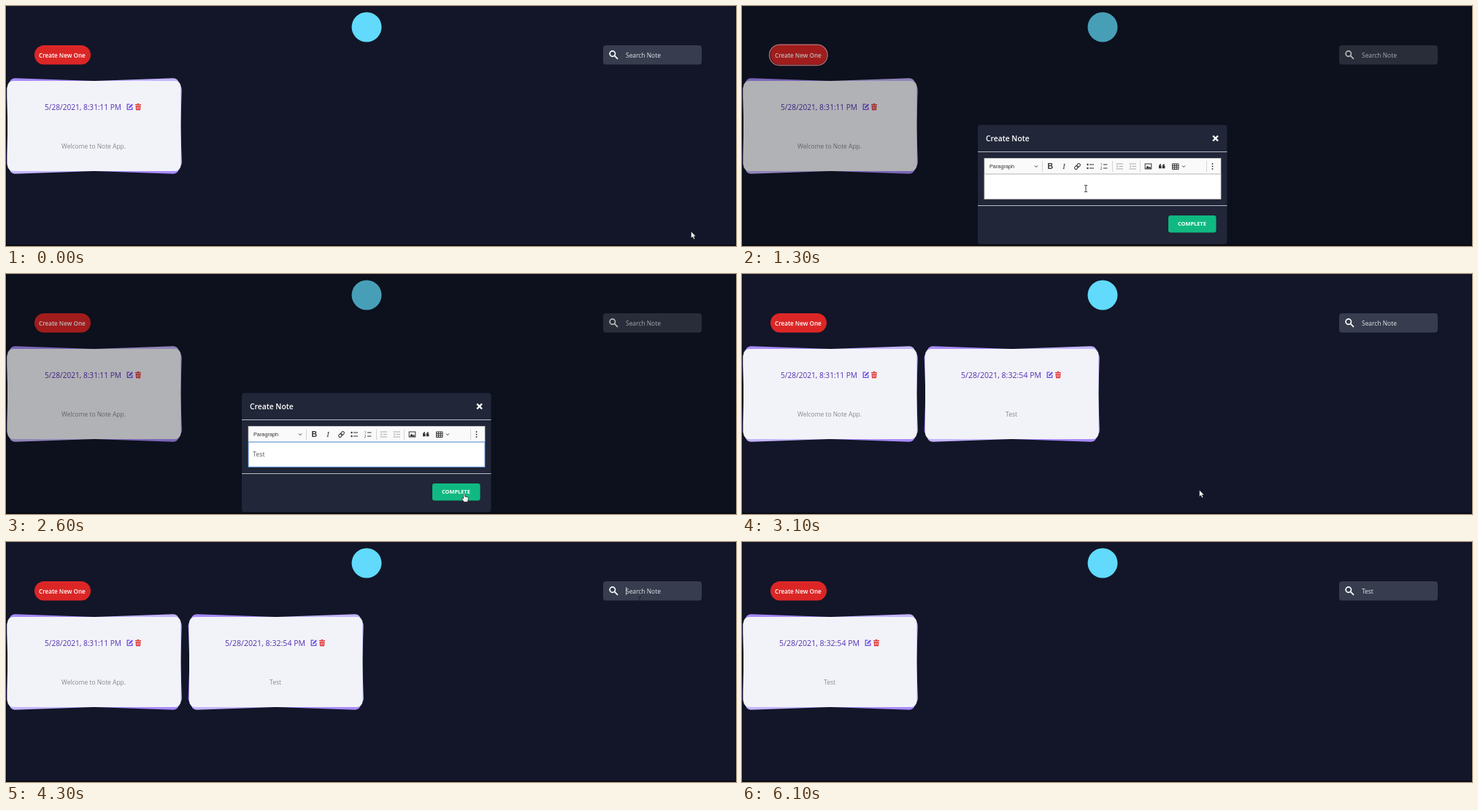
Animation of 1000 by 330 pixels, one loop 6.2 s. Source, as an HTML page:

```html
<!DOCTYPE html>
<html lang="en">
<head>
<meta charset="utf-8">
<title>Note board</title>
<style>
  html, body { margin: 0; width: 100%; height: 100%; overflow: hidden; background: #121628; }
  svg { display: block; width: 100%; height: 100%; }
  text { font-family: "Open Sans", "Noto Sans", sans-serif; font-size: 8.45px; white-space: pre; }
  .bold { font-weight: 600; fill: #fff; }
  .line { fill: none; stroke: #333; stroke-width: 1; }
  .pale { stroke: #aaa; }
</style>
</head>
<body>
<svg viewBox="0 0 1000 330">
  <defs>
    <g id="paper">
      <rect x="2.5" y="103" width="236.5" height="124" rx="8" fill="#a78bfa" transform="rotate(2 120.7 165)"/>
      <rect x="2.5" y="103" width="236.5" height="124" rx="8" fill="#c4b5fd" transform="rotate(-2 120.7 165)"/>
      <rect x="2" y="103" width="237.5" height="124" rx="8" fill="#f2f3f8"/>
    </g>
    <g id="tools">
      <path d="M4.5 1.2H1.2V8.3H7.8V5" fill="none" stroke="#6d4df2" stroke-width="1.3"/>
      <path d="M3 6.4L3.4 4.5L7.4 .4L9 2L5 6Z" fill="#6d4df2"/>
      <path d="M12 1H14.5L15 0H17L17.5 1H20V2.3H12ZM12.6 3H19.4L19 9.2H13Z" fill="#e03131"/>
      <path d="M14.5 4V8M16 4V8M17.5 4V8" stroke="#f2f3f8" stroke-width=".6"/>
    </g>
    <path id="chevron" d="M-2-1L0 1L2-1" class="line"/>
  </defs>

  <rect width="1000" height="330" fill="#121628"/>
  <circle cx="494" cy="29" r="20.5" fill="#61dafb"/>

  <rect x="39" y="54" width="77" height="26.5" rx="13.2" fill="#dc2626"/>
  <text x="45" y="70.6" class="bold" style="font-size:8.15px">Create New One</text>

  <rect x="818" y="54" width="135" height="26.5" rx="4" fill="#373d4e"/>
  <g fill="none" stroke="#fff" stroke-width="1.7">
    <circle cx="830.8" cy="65.6" r="3.7"/><path d="M833.6 68.4L838 72.8"/>
  </g>
  <text id="query" x="849" y="70.5" fill="#e4e6eb"></text>
  <path id="queryCaret" d="M0 62V73" stroke="#e4e6eb" stroke-width=".8"/>

  <g id="first">
    <use href="#paper"/>
    <text x="53" y="142.7" fill="#5430b0" style="font-size:10.1px;font-weight:500">5/28/2021, 8:31:11 PM</text>
    <use href="#tools" x="165" y="134"/>
    <text x="120" y="196" fill="#87878f" text-anchor="middle">Welcome to Note App.</text>
  </g>
  <g id="second">
    <use href="#paper"/>
    <text x="51" y="142.7" fill="#5430b0" style="font-size:10.6px;font-weight:500">5/28/2021, 8:32:54 PM</text>
    <use href="#tools" x="168" y="134"/>
    <text x="120" y="196" fill="#87878f" text-anchor="middle">Test</text>
  </g>

  <rect id="createRing" x="37.5" y="53.2" width="79.5" height="28.4" rx="14.2" fill="none" stroke="#f58a8a" stroke-width="1.5"/>
  <rect id="shade" width="1000" height="330"/>

  <g id="dialog">
    <rect x="323" y="163.5" width="341.5" height="164" rx="4" fill="#212638"/>
    <path d="M323 200.5H664.5M323 274.5H664.5" stroke="#b9bcc4"/>
    <text x="334" y="185.8" class="bold" style="font-size:10.3px">Create Note</text>
    <path d="M645.2 178.5L652 185.5M652 178.5L645.2 185.5" stroke="#fff" stroke-width="2.4"/>

    <rect x="332" y="209.5" width="324" height="56" fill="#fff"/>
    <rect x="332" y="209.5" width="324" height="21.5" fill="#fafafa" stroke="#c4c4c4" stroke-width=".7"/>
    <text x="339" y="223" fill="#333" style="font:7.3px 'Liberation Sans',Arial,sans-serif">Paragraph</text>
    <use href="#chevron" x="403" y="220.5"/>
    <use href="#chevron" x="605" y="220.5"/>
    <path d="M411.5 213V228M507.5 213V228M545.5 213V228M636.5 213V228" stroke="#ccc" stroke-width=".8"/>
    <g fill="#333">
      <text x="418.6" y="224.3" style="font:bold 10.5px 'Liberation Sans',Arial,sans-serif">B</text>
      <text x="439.3" y="224.3" style="font:italic 10.5px 'Liberation Serif',Times,serif">I</text>
      <g transform="rotate(-45 459.5 220.5)" class="line">
        <rect x="454.8" y="218.6" width="5.2" height="3.8" rx="1.9"/>
        <rect x="459" y="218.6" width="5.2" height="3.8" rx="1.9"/>
      </g>
      <circle cx="473.5" cy="218" r="1.2"/><circle cx="473.5" cy="223" r="1.2"/>
      <path class="line" d="M476 218H482M476 223H482M495 218H500.5M495 223H500.5"/>
      <text x="490.7" y="219.8" style="font-size:4.6px">1</text>
      <text x="490.7" y="225" style="font-size:4.6px">2</text>
      <path class="line pale" d="M512.5 217H522M516.5 220.5H522M512.5 224H522M515 218.8L513 220.5L515 222.2M530.5 217H540M534.5 220.5H540M530.5 224H540M531 218.8L533 220.5L531 222.2"/>
      <rect x="552.2" y="217" width="8.6" height="7" class="line"/>
      <path d="M553 223.5L555.5 219.5L557.5 222L558.8 220.8L560.3 223.5Z"/>
      <path d="M571 221Q571 217.5 574 217V218.3L573 219.5H574.6V223.3H571ZM575.8 221Q575.8 217.5 578.8 217V218.3L577.8 219.5H579.4V223.3H575.8Z"/>
      <path class="line" d="M589.5 217H598V224.5H589.5ZM589.5 219.5H598M589.5 222H598M592.3 217V224.5M595.2 217V224.5"/>
      <circle cx="644.5" cy="217" r=".9"/><circle cx="644.5" cy="220.5" r=".9"/><circle cx="644.5" cy="224" r=".9"/>
    </g>
    <rect id="field" x="332" y="231" width="324" height="34.3" fill="none" stroke-width=".9"/>
    <text id="note" x="338" y="251" fill="#555b66" style="font-size:8.8px"></text>
    <path id="noteCaret" d="M0 242V254" stroke="#222" stroke-width=".8"/>

    <rect id="doneRing" x="582.5" y="286.5" width="68.5" height="26.5" rx="4" fill="none" stroke="#7be0bd" stroke-width="1.5"/>
    <rect x="584" y="288" width="65.5" height="23.5" rx="3" fill="#10b981"/>
    <text x="597" y="302.4" class="bold" style="font-size:7.4px;font-weight:700">COMPLETE</text>
  </g>

  <path d="M0 0H1V330H0ZM999 0H1000V330H999ZM0 328.3H1000V330H0Z" fill="#080a12"/>

  <g id="pointer">
    <path id="arrow" d="M0 0V9.2L2.1 7.3L3.7 10.8L5.2 10.1L3.7 6.8H6.5Z" fill="#fff" stroke="#111" stroke-width=".5"/>
    <path id="hand" d="M0 1Q1-.5 2 1V5L6 5.8Q7 6.2 6.8 7.5L6 12.5H1L-2.2 8.2Q-2.4 6.6-1 7L0 8Z" fill="#fff" stroke="#111" stroke-width=".7"/>
    <path id="beam" d="M-2-4.5H-.5L0-4L.5-4.5H2M0-4V4M-2 4.5H-.5L0 4L.5 4.5H2" fill="none" stroke="#1b1d24" stroke-width=".9"/>
  </g>
</svg>
<script>
const LOOP = 6200, STEP = 100;
const el = id => document.getElementById(id);
const show = (id, on) => el(id).style.visibility = on ? "visible" : "hidden";
const clamp = v => Math.max(0, Math.min(1, v));
const ramp = (t, a, b) => clamp((t - a) / (b - a));
const ease = p => p * p * (3 - 2 * p);
const within = (t, a, b) => t >= a && t < b;
const blink = (t, from) => t < from || Math.floor((t - from) / 500) % 2 === 0;
const typed = (t, times) => "Test".slice(0, times.filter(k => t >= k).length);

// pointer path: time, x, y
const path = [
  [100, 938.5, 310], [700, 80, 67], [800, 80, 67], [1200, 471, 251], [1700, 471, 251],
  [2100, 626.5, 301], [2800, 626.5, 301], [3100, 626.5, 297], [3500, 700, 215],
  [4100, 868, 80], [5200, 868, 80], [5600, 862, 287], [5800, 850, 345]
];

function pointerAt(t) {
  const i = path.findIndex(k => k[0] > t);
  if (i === 0) return path[0].slice(1);
  if (i < 0) return path[path.length - 1].slice(1);
  const [a, ax, ay] = path[i - 1], [b, bx, by] = path[i];
  const p = ease(ramp(t, a, b));
  return [ax + (bx - ax) * p, ay + (by - ay) * p];
}

function pointerKind(x, y, modal) {
  const over = (l, t, r, b) => x >= l && x <= r && y >= t && y <= b;
  if (modal) {
    if (over(332, 231, 656, 265)) return "beam";
    if (over(584, 288, 650, 312)) return "hand";
    return "arrow";
  }
  if (over(39, 54, 116, 81)) return "hand";
  return over(818, 54, 953, 81) ? "beam" : "arrow";
}

function setText(id, text, caretOn) {
  const node = el(id), caret = el(id + "Caret");
  node.textContent = text;
  const width = text && text !== "Search Note" ? node.getComputedTextLength() : 0;
  caret.setAttribute("transform", `translate(${+node.getAttribute("x") + width + .6})`);
  caret.style.opacity = caretOn ? 1 : 0;
}

function draw(t) {
  const fade = ramp(t, 700, 1000) - ramp(t, 2800, 3100);
  el("shade").style.opacity = .27 * fade;
  el("dialog").style.opacity = fade;
  show("createRing", within(t, 800, 1400));
  el("doneRing").style.opacity = within(t, 2700, 3100) ? 1 : 0;

  const focused = within(t, 1400, 2700);
  el("field").setAttribute("stroke", focused ? "#4a8ee0" : "#c4c4c4");
  setText("note", typed(t, [1500, 1600, 1700, 1800]), focused && blink(t, 2100));
  setText("query", typed(t, [4400, 4700, 4900, 5200]) || "Search Note", t >= 4200 && blink(t, 5300));

  const filtered = t >= 4900;
  show("first", !filtered);
  show("second", t >= 2900);
  el("second").setAttribute("transform", `translate(${filtered ? 0 : 249})`);

  const [x, y] = pointerAt(t);
  const kind = pointerKind(x, y, within(t, 900, 2900));
  el("pointer").setAttribute("transform", `translate(${x} ${y})`);
  for (const k of ["arrow", "hand", "beam"]) show(k, k === kind);
}

const start = performance.now();
function tick() {
  const t = (performance.now() - start) % LOOP;
  draw(Math.floor(t / STEP) * STEP);
  requestAnimationFrame(tick);
}
tick();
</script>
</body>
</html>
```
